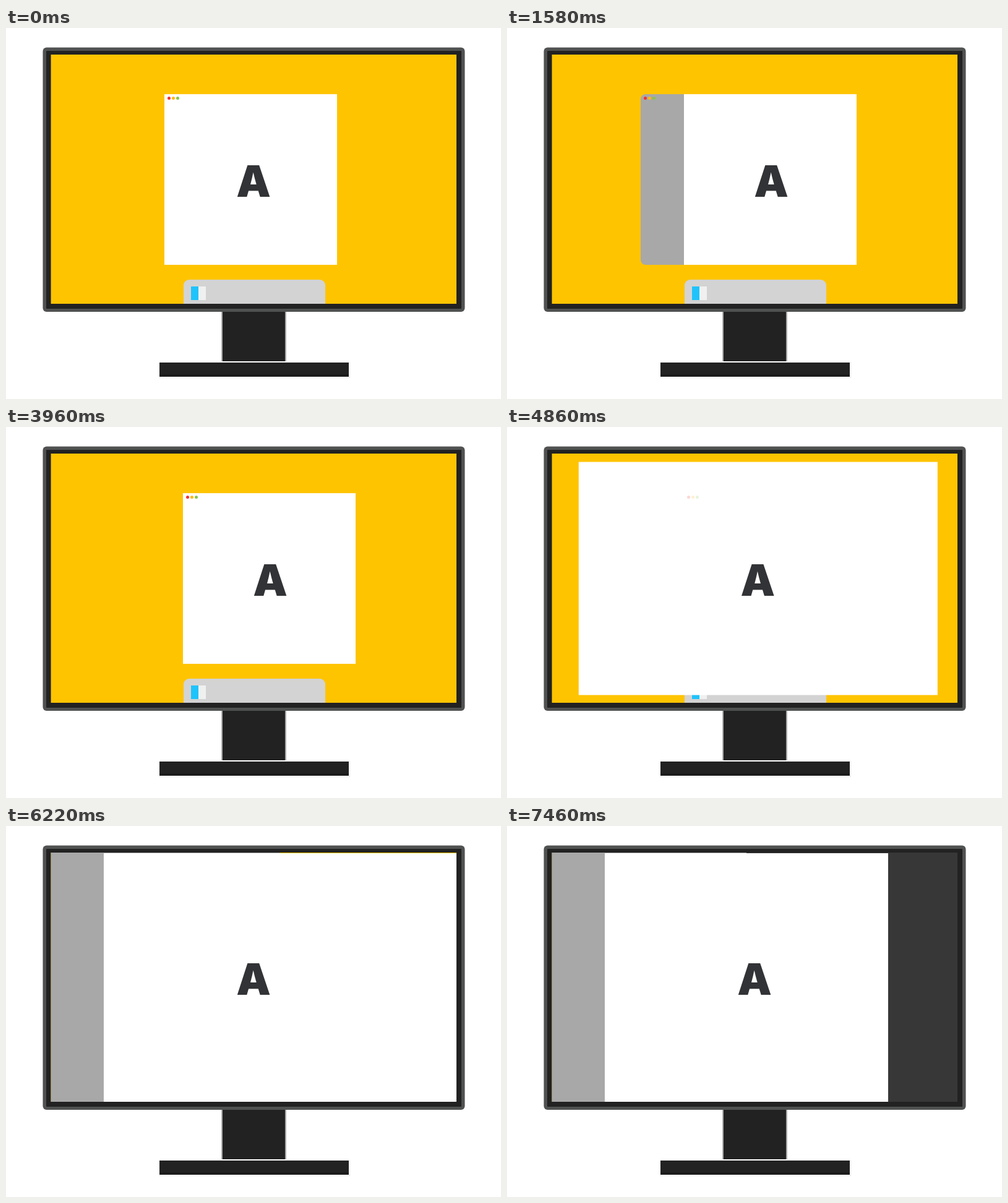
An HTML page with a canvas that plays this animation: 800x600 px, repeating every 8000 ms.

```html
<!DOCTYPE html>
<html lang="en">
<head>
<meta charset="utf-8">
<title>Window panels</title>
<style>
  html, body { margin: 0; width: 100%; height: 100%; overflow: hidden; background: #fff; }
  canvas { display: block; }
</style>
</head>
<body>
<canvas id="stage" width="800" height="600"></canvas>
<script>
const ctx = document.getElementById('stage').getContext('2d');
const LOOP = 8000, FIRST = 44, STEP = 1180, EASE_MS = 350;
const screen = { left: 72.6, right: 728, top: 43, bottom: 446 };
const home = 256, pageWidth = 279, panelWidth = 70, darkWidth = 87;
const centered = home + 30;

// Floating window: panels extend outwards from the page
function floating(pageLeft, leftPanel = 0, rightPanel = 0) {
  const pageRight = pageLeft + pageWidth, left = pageLeft - leftPanel;
  return {
    left, pageLeft, pageRight, right: pageRight + rightPanel,
    top: 107, bottom: 383, inset: 0, radius: 8,
    letter: 400 + (pageLeft - home) * 0.9, dots: left + 7.5, alpha: 1
  };
}

// Full screen: panels cover the page, which leaves a hairline of wallpaper
function maximized(leftPanel = 0, rightPanel = 0) {
  return {
    left: screen.left, pageLeft: 74 + leftPanel,
    pageRight: screen.right - rightPanel, right: screen.right,
    top: screen.top + 1, bottom: screen.bottom, inset: 1, radius: 0,
    letter: 400, dots: centered + 7.5, alpha: 0
  };
}

const poses = [
  floating(home),
  floating(home + panelWidth, panelWidth),
  floating(centered, panelWidth),
  floating(centered, panelWidth, darkWidth),
  floating(centered),
  maximized(),
  maximized(84),
  maximized(84, 112)
];

const easeOut = p => 1 - (1 - Math.min(p, 1)) ** 5;

function poseAt(t) {
  if (t < FIRST) return poses[0];
  const i = Math.floor((t - FIRST) / STEP);
  const k = easeOut((t - FIRST - i * STEP) / EASE_MS);
  const from = poses[i], to = poses[i + 1], pose = {};
  for (const key in to) pose[key] = from[key] + (to[key] - from[key]) * k;
  return pose;
}

// Filled box given by its edges
function box(color, left, top, right, bottom, radius = 0) {
  ctx.fillStyle = color;
  ctx.beginPath();
  ctx.roundRect(left, top, right - left, bottom - top, radius);
  ctx.fill();
}

function drawMonitor() {
  box('#aaa', 348, 459, 453, 539);
  box('#222', 350, 459, 451, 539);
  box('#e6e6e6', 247, 540, 556, 566);
  box('#fff', 247, 540, 555, 565);
  box('#222', 248, 541, 554, 564);
  box('#1b1b1b', 248, 560, 554, 564);
  box('#505151', 59.5, 31.5, 741.5, 459, 6);
  box('#222', 65, 37, 736, 454, 1);
  box('#ffc400', screen.left, screen.top, screen.right, screen.bottom);
}

function drawDock() {
  box('#d3d3d3', 287, 407, 516, screen.bottom, [9, 9, 0, 0]);
  box('#1fc3fb', 299, 418, 311, 440);
  box('#f0f0f0', 311, 418, 323, 440);
}

function drawWindow(w) {
  const middle = (w.pageLeft + w.pageRight) / 2;
  const panelTop = w.top - w.inset, r = w.radius;
  if (w.pageLeft - w.left > 1.5) box('#a8a8a8', w.left, panelTop, middle, w.bottom, [r, 0, 0, r]);
  if (w.right - w.pageRight > 0.2) box('#373737', middle, panelTop, w.right, w.bottom, [0, r, r, 0]);
  box('#fff', w.pageLeft, w.top, w.pageRight, w.bottom);

  ctx.globalAlpha = w.alpha;
  ['#f5302f', '#fdb913', '#8bc34a'].forEach((color, i) => {
    const x = w.dots + i * 7;
    box(color, x - 2.5, 111, x + 2.5, 116, 2.5);
  });
  ctx.globalAlpha = 1;

  ctx.fillStyle = '#323336';
  ctx.font = '900 70px Inter, sans-serif';
  ctx.textAlign = 'center';
  ctx.fillText('A', w.letter, 273);
}

function draw() {
  ctx.fillStyle = '#fff';
  ctx.fillRect(0, 0, 800, 600);
  drawMonitor();
  drawDock();
  drawWindow(poseAt(performance.now() % LOOP));
  requestAnimationFrame(draw);
}
draw();
</script>
</body>
</html>
```
